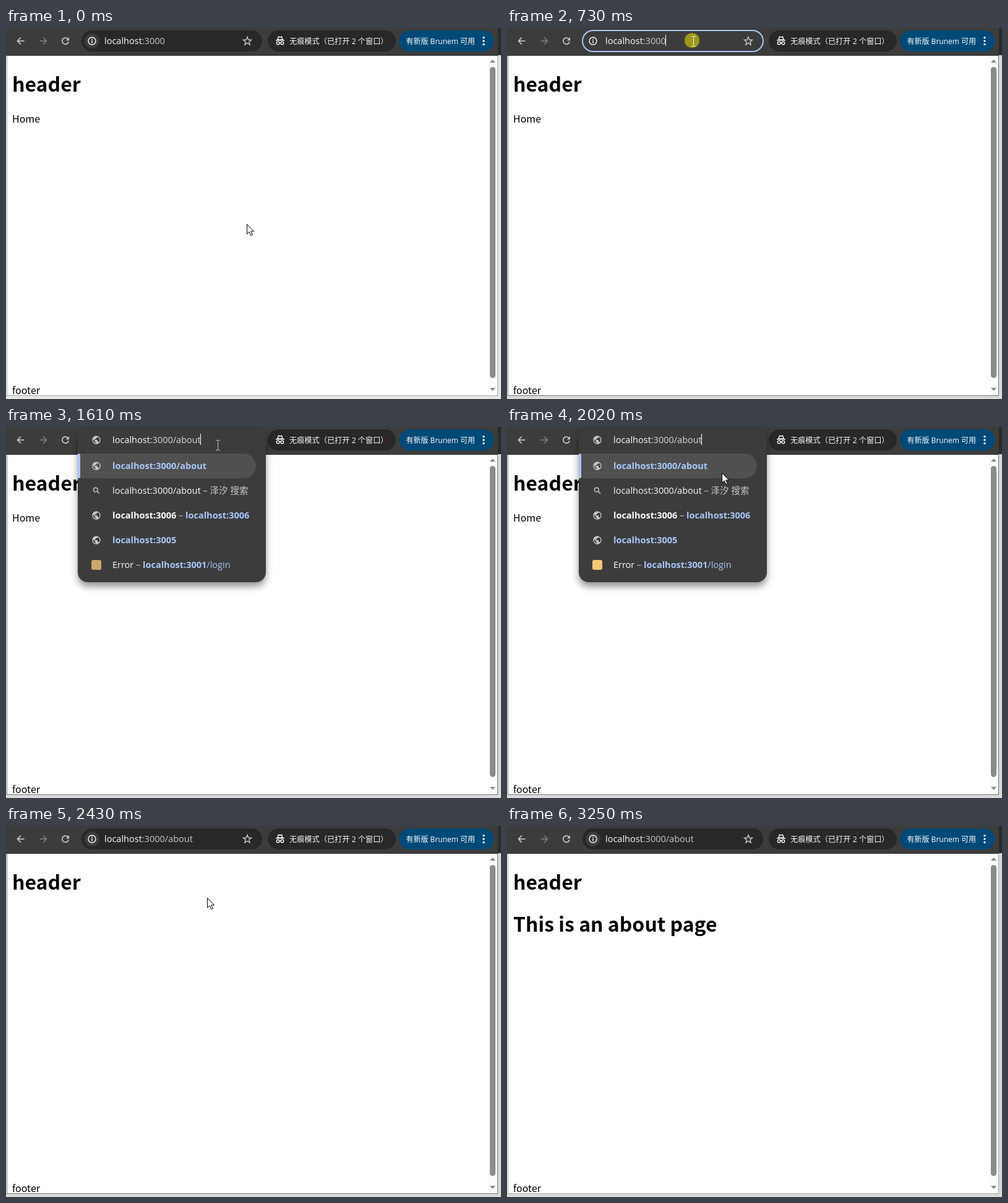
An HTML page with a canvas for the animation above (3380 ms loop, 800 by 600 pixels).

```html
<!DOCTYPE html>
<html lang="zh">
<head>
<meta charset="utf-8">
<title>localhost:3000</title>
<style>
  html, body { margin: 0; width: 100%; height: 100%; overflow: hidden; background: #fff; }
  canvas { display: block; width: 800px; height: 600px; }
</style>
</head>
<body>
<canvas id="stage" width="800" height="600"></canvas>
<script>
const ctx = document.getElementById('stage').getContext('2d');
const LOOP = 3380;
const UI = '"Open Sans", "Noto Sans CJK SC", "Noto Sans CJK", sans-serif';
const PAGE = '"Noto Sans CJK SC", "Noto Sans CJK", sans-serif';
const BAR = '#3c3c3c', DARK = '#282828', ICON = '#c7c7c7', WHITE = '#fafafa', BLUE = '#a8c7fa';
const GLOBE = new Path2D('M12 2C6.48 2 2 6.48 2 12s4.48 10 10 10 10-4.48 10-10S17.52 2 12 2zm-1 17.93c-3.95-.49-7-3.85-7-7.93 0-.62.08-1.21.21-1.79L9 15v1c0 1.1.9 2 2 2v1.93zm6.9-2.54c-.26-.81-1-1.39-1.9-1.39h-1v-3c0-.55-.45-1-1-1H8v-2h2c.55 0 1-.45 1-1V7h2c1.1 0 2-.9 2-2v-.41c2.93 1.19 5 4.06 5 7.41 0 2.08-.8 3.97-2.1 5.39z');
const ARROW = new Path2D('M.5.5V16.2L4.1 12.8 6.8 18.7 9.3 17.6 6.7 11.9H11.6Z');

// Pointer path: tick, x, y
const PATH = [
  [0, 389, 317], [1, 393, 309], [2, 403, 290], [3, 408, 258], [4, 403, 215],
  [6, 352, 115], [7, 318, 66], [8, 292, 35], [9, 298, 24], [10, 301, 21],
  [12, 301, 21], [15, 324, 29], [21, 324, 29], [24, 342, 29], [28, 342, 30],
  [29, 346, 54], [30, 347, 74], [31, 346, 72], [33, 345, 70], [36, 325, 116],
  [37, 342, 98], [38, 385, 84], [39, 455, 105], [40, 560, 190], [41, 670, 330],
  [42, 765, 510], [43, 780, 620], [50, 780, 620]
];

function pointer(k) {
  let i = 1;
  while (i < PATH.length - 1 && PATH[i][0] < k) i++;
  const [a, ax, ay] = PATH[i - 1], [b, bx, by] = PATH[i];
  const p = Math.min(1, Math.max(0, (k - a) / (b - a)));
  return [Math.round(ax + (bx - ax) * p), Math.round(ay + (by - ay) * p)];
}

function rect(x, y, w, h, color) {
  ctx.fillStyle = color;
  ctx.fillRect(x, y, w, h);
}

function round(x, y, w, h, r, color) {
  ctx.beginPath();
  ctx.roundRect(x, y, w, h, r);
  ctx.fillStyle = color;
  ctx.fill();
}

function disc(x, y, r, color) {
  ctx.beginPath();
  ctx.arc(x, y, r, 0, Math.PI * 2);
  ctx.fillStyle = color;
  ctx.fill();
}

function ring(x, y, r, color, width) {
  ctx.beginPath();
  ctx.arc(x, y, r, 0, Math.PI * 2);
  ctx.strokeStyle = color;
  ctx.lineWidth = width;
  ctx.stroke();
}

function poly(points, color, width, closed) {
  ctx.beginPath();
  points.forEach(([x, y]) => ctx.lineTo(x, y));
  if (closed) ctx.closePath();
  if (width) {
    ctx.strokeStyle = color;
    ctx.lineWidth = width;
    ctx.stroke();
  } else {
    ctx.fillStyle = color;
    ctx.fill();
  }
}

function text(str, x, y, color, font) {
  ctx.font = font;
  ctx.fillStyle = color;
  ctx.fillText(str, x, y);
  return x + ctx.measureText(str).width;
}

// Each run: string, colour, bold
function runs(x, y, list) {
  for (const [str, color, bold] of list)
    x = text(str, x, y, color, (bold ? '700 ' : '400 ') + '14.5px ' + UI);
  return x;
}

function globe(x, y) {
  ctx.save();
  ctx.translate(x - 8, y - 8);
  ctx.scale(2 / 3, 2 / 3);
  ctx.fillStyle = ICON;
  ctx.fill(GLOBE);
  ctx.restore();
}

function navArrow(x, dir, color) {
  poly([[x - 5.5 * dir, 21], [x + 5 * dir, 21]], color, 1.7);
  poly([[x + .2 * dir, 15.6], [x + 5.5 * dir, 21], [x + .2 * dir, 26.4]], color, 1.7);
}

function reload() {
  ctx.beginPath();
  ctx.arc(96, 21, 5.2, .25, Math.PI * 1.8);
  ctx.strokeStyle = ICON;
  ctx.lineWidth = 1.7;
  ctx.stroke();
  poly([[102, 15], [102, 20.2], [96.8, 20.2]], ICON, 0, true);
}

function star() {
  const pts = [];
  for (let i = 0; i < 10; i++) {
    const a = i * Math.PI / 5 - Math.PI / 2, r = i % 2 ? 2.9 : 6.9;
    pts.push([390 + r * Math.cos(a), 21.4 + r * Math.sin(a)]);
  }
  poly(pts, ICON, 1.4, true);
}

function hatAndGlasses() {
  poly([[438.8, 19], [440.4, 14.2], [443, 15], [445.6, 14.2], [447.2, 19]], WHITE, 1.4, true);
  poly([[436, 19.8], [450, 19.8]], WHITE, 1.5);
  ring(439.6, 24.4, 2.3, WHITE, 1.4);
  ring(446.4, 24.4, 2.3, WHITE, 1.4);
  poly([[441.8, 23.8], [444.2, 23.8]], WHITE, 1.2);
}

function addressBar(k, url) {
  const focused = k >= 10 && k < 34;
  if (focused) {
    round(121, 3, 294, 36, 18, BLUE);
    round(123, 5, 290, 32, 16, BAR);
  } else {
    round(122, 4, 292, 34, 17, DARK);
    disc(139, 21, 12, BAR);
  }
  ring(139, 21, 6, WHITE, 1.4);
  rect(138.3, 20, 1.5, 4.4, WHITE);
  rect(138.3, 17.4, 1.5, 1.6, WHITE);
  const end = runs(159, 26, [['localhost', WHITE], [url, ICON]]);
  star();
  if (k >= 10 && k < 19) rect(Math.floor(end), 11, 1, 18, '#fff');
}

function toolbar(k, url) {
  rect(0, 0, 795, 45, BAR);
  navArrow(24, -1, ICON);
  navArrow(60, 1, '#7c7c7c');
  reload();
  addressBar(k, url);
  round(423, 4, 207, 34, 17, DARK);
  hatAndGlasses();
  text('无痕模式（已打开 2 个窗口）', 458, 26, WHITE, '12.2px ' + UI);
  round(635, 4, 153.5, 34, 17, '#004a77');
  text('有新版 Brunem 可用', 646.5, 26, '#fff', '12px ' + UI);
  for (const y of [15.5, 21, 26.5]) disc(772, y, 1.7, '#fff');
}

function page(k, active) {
  // Window edge and the desktop behind it
  rect(0, 0, 800, 600, k >= 9 ? '#dadada' : '#e6e6e6');
  rect(795, 0, 5, 44, '#2b2b2b');
  rect(1, 44, 794, 551, active ? '#777' : '#a9a9a9');
  rect(2, 45, 792, 549, '#fff');
  rect(0, 44, 1, 551, '#f2f2f2');

  text('header', 10, 103, '#000', '700 32px ' + PAGE);
  if (k < 35) text('Home', 10, 153, '#000', '16px ' + PAGE);
  if (k >= 38) text('This is an about page', 10, 171, '#000', '700 32px ' + PAGE);
  text('footer', 10, 592, '#000', '16px ' + PAGE);

  rect(779, 45, 15, 549, '#fcfcfc');
  round(782, 63, 9, 503, 4.5, '#8b8b8b');
  poly([[782, 56], [786.5, 51], [791, 56]], '#8b8b8b', 0, true);
  poly([[782, 582], [786.5, 587], [791, 582]], '#8b8b8b', 0, true);
}

function popup(k, typed) {
  const alpha = k < 34 ? 1 : (36 - k) * .3;
  if (k < 21 || alpha <= 0) return;
  ctx.save();
  ctx.globalAlpha = alpha;
  ctx.save();
  ctx.shadowColor = 'rgba(0,0,0,.42)';
  ctx.shadowBlur = 12;
  ctx.shadowOffsetY = 7;
  round(116, 2, 304, 249, 16, BAR);
  ctx.restore();

  round(116, 43, 288, 40, [0, 20, 20, 0], '#505050');
  round(116, 43, 4, 40, [0, 3, 3, 0], BLUE);
  for (const y of [21, 63, 143, 183]) globe(146, y);
  ring(144.8, 101.6, 3.4, ICON, 1.4);
  poly([[147.2, 104], [151, 107.8]], ICON, 1.5);

  const end = runs(172, 26, [['localhost', WHITE], [typed, '#d6d6d6']]);
  rect(Math.floor(end), 11, 1, 18, '#fff');
  runs(172, 68, [['localhost' + typed, BLUE, true]]);
  runs(172, 108, [['localhost' + typed, WHITE], [' – 泽汐 搜索', ICON]]);
  runs(172, 148, [['localhost:3006', WHITE, true], [' – ', ICON], ['localhost:3006', BLUE, true]]);
  runs(172, 188, [['localhost:3005', BLUE, true]]);
  runs(172, 228, [['Error', WHITE], [' – ', ICON], ['localhost:3001', BLUE, true], ['/login', BLUE]]);

  ctx.globalAlpha = alpha * Math.min(1, .6 + (k - 21) * .06);
  round(138, 215, 16, 16, 3, '#f5c678');
  ctx.restore();
}

function mouse(k) {
  const [x, y] = pointer(k);
  const click = (k >= 10 && k <= 12) || k === 32 || k === 33;
  if (click) disc(x - 2, y - 1, 12, 'rgba(248,240,0,.52)');
  if (k >= 9 && k < 29) {
    const c = click ? '#f4f4d0' : '#c4c4c4';
    rect(x, y - 7, 1, 15, c);
    for (const top of [y - 8, y + 8]) {
      rect(x - 3, top, 3, 1, c);
      rect(x + 1, top, 3, 1, c);
    }
    return;
  }
  ctx.save();
  ctx.translate(x, y);
  ctx.fillStyle = '#fff';
  ctx.fill(ARROW);
  ctx.strokeStyle = '#000';
  ctx.lineWidth = 1;
  ctx.stroke(ARROW);
  ctx.restore();
}

function draw(now) {
  const k = Math.floor((now % LOOP + 30) / 68.2);
  const active = k >= 10 && k < 48;
  const typed = ':3000' + '/about'.slice(0, Math.max(0, (k - 20) * 2 - 1));
  page(k, active);
  toolbar(k, k >= 34 ? ':3000/about' : ':3000');
  popup(k, typed);
  mouse(k);
}

const start = performance.now();
function loop() {
  draw(performance.now() - start);
  requestAnimationFrame(loop);
}
loop();
</script>
</body>
</html>
```
